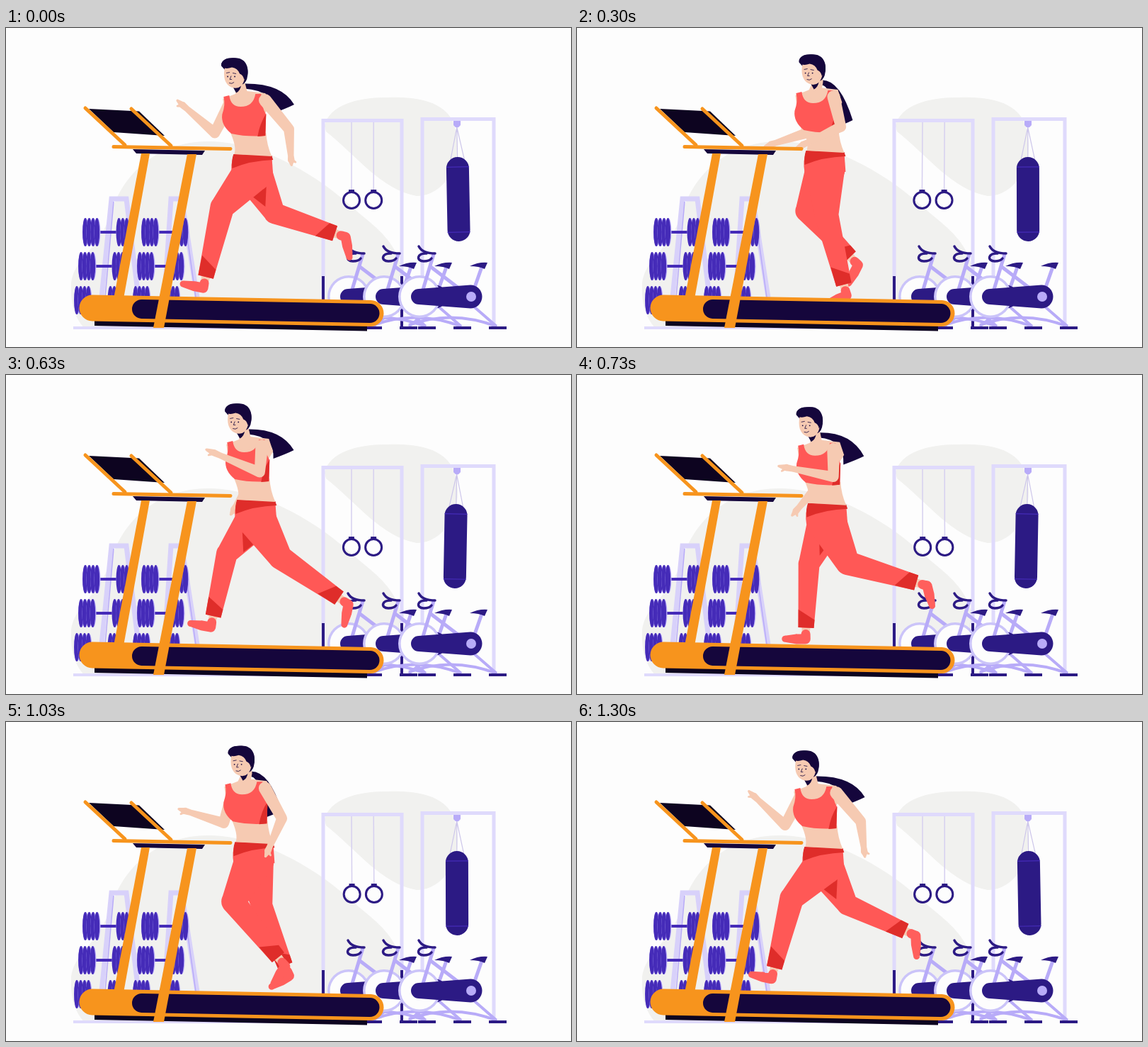
Write an HTML page with a canvas that moves like this. It is 798x450 px and loops after 1330 ms.

```html
<!DOCTYPE html>
<html lang="en">
<head>
<meta charset="utf-8">
<title>Treadmill run</title>
<style>
html, body { margin: 0; width: 100%; height: 100%; overflow: hidden; background: #fdfdfd; }
canvas { display: block; }
</style>
</head>
<body>
<canvas id="stage" width="798" height="450"></canvas>
<script>
const ctx = document.getElementById('stage').getContext('2d');
const LOOP = 1330, STEPS = 40, TURN = Math.PI * 2;
const C = {
  bg: '#fdfdfd', blob: '#f1f1ef', pale: '#dfdafc', lilac: '#b8abf8', ink: '#2c1a84', violet: '#452bb8',
  orange: '#f7941d', dark: '#15063c', black: '#0d0420', skin: '#f6cab2', coral: '#ff5856', red: '#df2d2a', shoe: '#ff5f5c'
};

// Mean plus harmonics, given as [cosine, sine] pairs.
const wave = (angle, mean, ...harmonics) =>
  harmonics.reduce((sum, [c, s], i) => sum + c * Math.cos((i + 1) * angle) + s * Math.sin((i + 1) * angle), mean);

const mix = (a, b, u) => [a[0] + (b[0] - a[0]) * u, a[1] + (b[1] - a[1]) * u];
const offset = (p, n, r) => [p[0] + n[0] * r, p[1] + n[1] * r];
// Degrees are measured from straight down, positive to the right.
function reach(p, degrees, length) {
  const a = degrees * Math.PI / 180;
  return [p[0] + Math.sin(a) * length, p[1] + Math.cos(a) * length];
}
function normal(a, b) {
  const dx = b[0] - a[0], dy = b[1] - a[1], len = Math.hypot(dx, dy) || 1;
  return [dy / len, -dx / len];
}

function polyPath(points, path = new Path2D()) {
  points.forEach((p, i) => i ? path.lineTo(...p) : path.moveTo(...p));
  path.closePath();
  return path;
}
function fill(shape, color) {
  ctx.fillStyle = color;
  ctx.fill(typeof shape === 'string' ? new Path2D(shape) : Array.isArray(shape) ? polyPath(shape) : shape);
}
function stroke(d, color, width, cap = 'butt') {
  ctx.strokeStyle = color;
  ctx.lineWidth = width;
  ctx.lineCap = cap;
  ctx.lineJoin = cap === 'round' ? 'round' : 'miter';
  ctx.stroke(new Path2D(d));
}
function disc(x, y, rx, color, ry = rx) {
  const p = new Path2D();
  p.ellipse(x, y, rx, ry, 0, 0, TURN);
  fill(p, color);
}
function rect(x, y, w, h, color) {
  ctx.fillStyle = color;
  ctx.fillRect(x, y, w, h);
}
function at(x, y, draw, angle = 0) {
  ctx.save();
  ctx.translate(x, y);
  ctx.rotate(angle);
  draw();
  ctx.restore();
}

// Tapered chain of [point, radius] pairs.
function taper(chain, flatEnd = false) {
  const path = new Path2D();
  chain.forEach(([p, r], i) => {
    const last = i === chain.length - 1;
    if (!last || !flatEnd) {
      path.moveTo(p[0] + r, p[1]);
      path.arc(p[0], p[1], r, 0, TURN);
    }
    if (last) return;
    const [q, s] = chain[i + 1], n = normal(p, q);
    polyPath([offset(p, n, r), offset(q, n, s), offset(q, n, -s), offset(p, n, -r)], path);
  });
  return path;
}

function dumbbell() {
  stroke('M15 0H50', C.violet, 4);
  const plates = (x, count) => {
    for (let i = 0; i < count; i++) {
      disc(x + i * 5.5, 0, 4.5, C.lilac, 20);
      disc(x + i * 5.5 - 0.6, 0, 3.8, C.violet, 20);
    }
  };
  plates(4.5, 4);
  plates(52, 3);
}

function bike() {
  stroke('M605 392L569 421M655 388L693 421M569 419Q630 397 693 421', C.lilac, 4);
  stroke('M600 337L646 372M672 337L659 374', C.lilac, 5);
  disc(584, 379, 30, '#cbc4f9');
  disc(584, 379, 26.5, C.bg);
  stroke('M604 319L588 372', C.lilac, 5);
  fill(taper([[[583, 379], 11], [[656, 379], 16.5]]), C.ink);
  disc(657, 379, 7, C.lilac);
  stroke('M583 308Q588 318 606 318M594 318C580 317 579 329 590 329Q598 329 601 325', C.ink, 3.5, 'round');
  fill('M655 336Q667 330 680 331L676 340Q668 336 655 336Z', C.ink);
  rect(556, 421, 25, 4, C.ink);
  rect(682, 421, 25, 4, C.ink);
}

function scenery(phase) {
  rect(0, 0, 798, 450, C.bg);
  fill('M92 362C95 325 130 315 148 262C165 205 215 158 290 160C360 162 430 202 480 245C520 282 562 300 562 370C562 410 530 423 480 423H110Q90 400 92 362Z', C.blob);
  fill('M450 138C456 108 500 97 540 98C590 96 632 108 636 150C645 190 620 237 580 237C530 228 495 180 452 146Z', C.blob);
  rect(95, 421, 300, 4, C.pale);

  stroke('M135 380L149 241H170L187 380M224 380L233 241H248L270 380', '#d8d1fa', 7);
  stroke('M152 245L140 380M249 245L268 380', C.lilac, 1.5);
  for (let row = 0; row < 3; row++) {
    at(108 - row * 6, 288 + row * 48, dumbbell);
    at(191 - row * 6, 288 + row * 48, dumbbell);
  }

  stroke('M448 383V130.5H559V350', C.pale, 5);
  stroke('M448 350V383M559 350V423', C.ink, 4);
  stroke('M588 420V128.5H689V421', C.pale, 5);
  for (const x of [488, 519.2]) at(x, 133, () => {
    stroke('M0 0V96', '#d6d0f0', 1.5);
    rect(-4, 95, 8, 4, C.ink);
    stroke('M11.5 110A11.5 11.5 0 1 1 -11.5 110A11.5 11.5 0 1 1 11.5 110', C.ink, 3);
  }, 0.006 * Math.sin(phase));
  fill('M632 131H642V137Q637 144 632 137Z', C.lilac);
  at(636.7, 135, () => {
    stroke('M0 5L-10 52M0 5V48M0 5L10 52', '#cdc6ea', 1.2);
    fill(taper([[[0, 63], 16], [[0, 150], 16]]), C.ink);
    stroke('M-16 61H16M-16 153H16', C.violet, 1.2);
  }, -0.019 * Math.cos(phase));

  [-100, -50, 0].forEach(x => at(x, 0, bike));
}

function treadmill() {
  fill('M125 412L510 418V427.5L125 420Z', C.black);
  stroke('M152 167.5L317 170.5', C.orange, 5, 'round');
  fill('M179 171L281 173L277 179L184 177Z', C.dark);
  fill('M117 114L188 117.5L224 152L152 147Z', C.black);
  stroke('M112 113L168 165M177 114L233 166', C.orange, 5, 'round');
  fill('M191 177H203L166 382H152Z', C.orange);
  stroke('M122 395L515 402.5', C.orange, 37, 'round');
  stroke('M191.5 396.5L514 402.5', C.dark, 27, 'round');
  fill('M256 178H269L223 423H208Z', C.orange);
}

function arm(shoulder, upper, upperLength, fore, foreLength) {
  const elbow = reach(shoulder, upper, upperLength), tip = reach(elbow, fore, foreLength);
  const wrist = mix(elbow, tip, 0.74), palm = mix(elbow, tip, 0.86);
  fill(taper([[shoulder, 9], [elbow, 7.5], [wrist, 4.2], [palm, 4.8], [tip, 1.8]]), C.skin);
  const thumb = offset(mix(elbow, tip, 0.93), normal(elbow, tip), 6);
  fill(taper([[palm, 3], [thumb, 1.3]]), C.skin);
}

// One running stride; both legs share it, half a loop apart.
function stride(hip, phase, shinLength, kneeRadius) {
  const thigh = wave(phase, -7, [-32.7, 13.2], [2.2, 4], [-3.8, 0]);
  const shin = wave(phase, 28.5, [-37.8, -16.6], [-4, 13]);
  const foot = shin - 88 + 0.38 * Math.max(0, shin);
  const knee = reach(hip, thigh, 65), hem = reach(knee, shin, shinLength);
  const ankle = reach(hem, shin, 9), heel = reach(hem, shin, 16), toe = reach(heel, foot, 29);
  return { hip, knee, hem, ankle, heel, toe, kneeRadius };
}

function leg({ hip, knee, hem, ankle, heel, toe, kneeRadius }) {
  fill(taper([[hem, 6], [ankle, 5.5]]), C.skin);
  fill(taper([[ankle, 6.5], [heel, 7], [mix(heel, toe, 0.45), 7], [toe, 4.5]]), C.shoe);
  fill(taper([[hip, 28], [knee, kneeRadius], [hem, 11]], true), C.coral);
  const n = normal(knee, hem);
  fill([offset(mix(knee, hem, 0.87), n, 11.5), offset(hem, n, 11), offset(hem, n, -11), offset(mix(knee, hem, 0.72), n, -12)], C.red);
}

function torso() {
  fill('M322 178L375 180L377 208H319Q316 192 322 178Z', C.coral);
  fill('M321 178L375 180L377 186Q345 187 319 198Q318 186 321 178Z', C.red);
  fill('M316 146L367 148Q368 165 375 181L322 178Q326 168 316 146Z', C.skin);
  fill('M306 100L326 92L340 89L366 92L372 110L362 126H310Z', C.skin);
  fill('M307 97L315 95Q317 111 331 111Q349 111 352 93L360 93Q360 110 367 122L366 152Q340 154 318 149Q303 137 305 122Q310 108 307 97Z', C.coral);
  fill('M367 121L366 152L355 153Q358 135 367 121Z', C.red);
}

function head() {
  fill('M319 82L331 80Q330 88 324 91Z', C.dark);
  fill('M303 53C302 43 315 41 325 42C338 43 342 55 340 67Q339 76 333 79L320 72Z', C.dark);
  fill('M308 55C305 68 308 79 317 83C326 87 334 82 336 70L331 56L318 50Z', C.skin);
  fill('M303 52C303 44 312 41 322 42C336 42 342 55 340 66L335 72Q334 66 329 64Q326 56 318 55Q307 59 303 52Z', C.dark);
  stroke('M310 63L315 62M319 63L324 64M317 67L315 72L318 72M314 77Q318 79 321 76', C.dark, 0.8);
  disc(312, 68, 0.9, C.dark);
  disc(322, 68, 0.9, C.dark);
}

function ponytail([x, y], phase) {
  const tip = [wave(phase, 398, [0, 0], [9, 0]), wave(phase, 118, [0, 0], [-10, 8])];
  const inner = [tip[0] - 29, tip[1] + 12];
  const hair = new Path2D();
  hair.moveTo(x, y - 2);
  hair.quadraticCurveTo(tip[0] - 18, y - 3, ...tip);
  hair.quadraticCurveTo(tip[0] - 10, tip[1] + 5, ...inner);
  hair.quadraticCurveTo(inner[0] + 2, y + 8, x, y + 5);
  fill(hair, C.dark);
}

function runner(phase) {
  const dx = wave(phase, 2.8, [-2.5, 0]), dy = wave(phase, -3.5, [0, 0], [3.5, 6]);
  const hx = dx + wave(phase, 4.6, [0, 0], [-3.8, 0]), hy = dy + 0.5;
  const swing = Math.cos(phase + 0.35);
  const hip = [348 + dx, 204 + dy];
  const near = stride(hip, phase, 101, 17);
  const far = stride(hip, phase + TURN * 0.5375, 90, 15);

  ponytail([335 + hx, 80 + hy], phase);
  arm([321 - 6 * swing + dx, 108 + dy], -5 - 24 * swing, 45, -82 - 52 * swing, 63 + 7 * swing);
  leg(far);

  // Shade on the inner far thigh, seen only when the legs are apart.
  const spread = far.knee[0] - near.knee[0];
  const s = Math.sign(spread) * Math.min(1, Math.max(0, (Math.abs(spread) - 40) / 25));
  fill([[20, 8], [0, 34], [18, 48]].map(([x, y]) => [hip[0] + s * x, hip[1] + y]), C.red);

  leg(near);
  at(dx, dy, torso);
  fill(taper([[[330 + hx, 80 + hy], 7], [[333 + dx, 97 + dy], 9]]), C.skin);
  at(hx, hy, head);
  arm([361 + 5 * swing + dx, 102 + dy], 18 + 23 * swing, 45 + 8 * swing, -53 + 61 * swing, 66 - 16 * swing);
}

const start = performance.now();
function draw() {
  const t = (performance.now() - start) % LOOP;
  const step = Math.min(STEPS - 1, Math.floor((t + 4) * 0.03));
  const phase = step / STEPS * TURN;
  scenery(phase);
  runner(phase);
  treadmill();
  requestAnimationFrame(draw);
}
draw();
</script>
</body>
</html>
```
